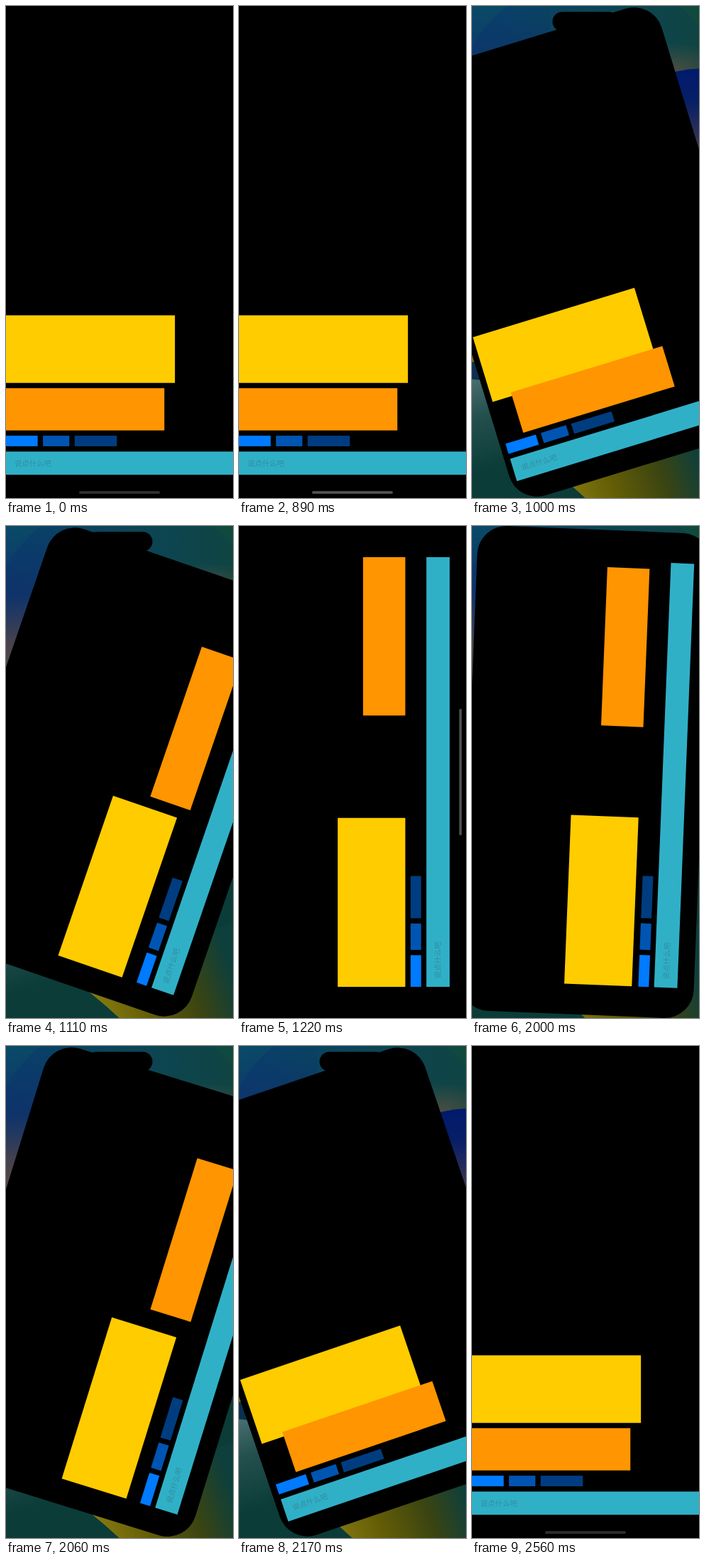
Animation, 320 px wide and 694 px high, one loop 3000 ms. Source, as an HTML page:

```html
<!DOCTYPE html>
<html lang="zh">
<head>
<meta charset="utf-8">
<title>Rotation</title>
<style>
  html, body { margin: 0; width: 100%; height: 100%; overflow: hidden; background: #000; }
  svg { display: block; width: 100%; height: 100%; }
  text { font: 14px "Noto Sans CJK SC", "Noto Sans CJK", sans-serif; fill: #3c3c43; fill-opacity: .3; }
</style>
</head>
<body>
<svg viewBox="0 0 430 932" preserveAspectRatio="none">
  <defs>
    <linearGradient id="sky">
      <stop offset="0" stop-color="#0a4a68"/>
      <stop offset=".55" stop-color="#0b4a58"/>
      <stop offset="1" stop-color="#10493c"/>
    </linearGradient>
    <linearGradient id="disc">
      <stop offset="0" stop-color="#093f70"/>
      <stop offset=".5" stop-color="#0b4558"/>
      <stop offset="1" stop-color="#11443c"/>
    </linearGradient>
    <linearGradient id="dusk" x2="0" y2="1">
      <stop offset="0" stop-color="#0c2c6c" stop-opacity="0"/>
      <stop offset=".45" stop-color="#10306a" stop-opacity=".8"/>
      <stop offset=".75" stop-color="#45424e"/>
      <stop offset="1" stop-color="#5a4a40"/>
    </linearGradient>
    <linearGradient id="navy" gradientUnits="userSpaceOnUse" x1="0" y1="88" x2="0" y2="205">
      <stop offset="0" stop-color="#001a6c"/>
      <stop offset=".4" stop-color="#081f66"/>
      <stop offset="1" stop-color="#41384e"/>
    </linearGradient>
    <linearGradient id="moss" gradientUnits="userSpaceOnUse" x1="0" y1="525" x2="40" y2="650">
      <stop offset="0" stop-color="#4a6f70"/>
      <stop offset=".4" stop-color="#24504e"/>
      <stop offset="1" stop-color="#0b3c38"/>
    </linearGradient>
    <linearGradient id="olive" gradientUnits="userSpaceOnUse" x1="135" y1="694" x2="320" y2="630">
      <stop offset="0" stop-color="#857a10"/>
      <stop offset=".35" stop-color="#625c06"/>
      <stop offset=".7" stop-color="#3a4412"/>
      <stop offset="1" stop-color="#0d3f3c"/>
    </linearGradient>
    <radialGradient id="ember">
      <stop offset="0" stop-color="#59503f" stop-opacity=".8"/>
      <stop offset="1" stop-color="#59503f" stop-opacity="0"/>
    </radialGradient>
  </defs>

  <g id="wall" transform="scale(1.34375)">
    <rect width="320" height="694" fill="url(#sky)"/>
    <circle cx="170" cy="150" r="193" fill="url(#disc)"/>
    <rect width="110" height="215" fill="url(#dusk)"/>
    <ellipse cx="285" cy="92" rx="70" ry="40" fill="url(#ember)"/>
    <circle cx="330" cy="300" r="212" fill="url(#navy)"/>
    <rect y="440" width="320" height="254" fill="#0b3c38"/>
    <rect y="440" width="30" height="62" fill="#8a6a10"/>
    <rect y="502" width="40" height="40" fill="#0b3050"/>
    <circle cx="-10" cy="694" r="168" fill="url(#moss)"/>
    <path d="M80 630Q120 656 160 694H320V560Z" fill="url(#olive)"/>
  </g>

  <g id="win">
    <rect id="back"/>
    <rect id="yellow" fill="#fc0"/>
    <rect id="orange" fill="#ff9500"/>
    <rect id="chip1" fill="#007aff"/>
    <rect id="chip2" fill="#0055b2"/>
    <rect id="chip3" fill="#003d80"/>
    <rect id="bar" fill="#30b0c7"/>
    <text id="hint">说点什么吧</text>
    <rect id="home" rx="2.5"/>
  </g>
  <rect id="island" x="152.5" y="11" width="125" height="37" rx="18.5"/>
</svg>

<script>
const LOOP = 3000, FPS = 18, TURN = 292;
const TO_WIDE = 912, TO_TALL = 1967;
const $ = id => document.getElementById(id);
const mix = (a, b, p) => a + (b - a) * p;
const clamp = v => Math.min(1, Math.max(0, v));

// Cubic bezier (.42, 0, .58, 1)
function easeInOut(x) {
  if (x <= 0 || x >= 1) return clamp(x);
  let lo = 0, hi = 1;
  for (let i = 0; i < 24; i++) {
    const s = (lo + hi) / 2, r = 1 - s;
    const bx = 1.26 * r * r * s + 1.74 * r * s * s + s * s * s;
    if (bx < x) lo = s; else hi = s;
  }
  return lo * lo * (3 - 2 * lo);
}

function place(id, x, y, w, h) {
  const el = $(id);
  el.setAttribute('x', x);
  el.setAttribute('y', y);
  el.setAttribute('width', w);
  el.setAttribute('height', h);
}

// Lays out the window between portrait (p = 0) and landscape (p = 1)
function layout(p) {
  const w = mix(430, 932, p), h = mix(932, 430, p);
  const left = mix(0, 59, p), right = w - left;
  const bottom = h - mix(44, 31, p);
  const barY = bottom - 44, chipY = barY - 30, cardEnd = chipY - 10;

  $('win').setAttribute('transform',
    `translate(215 466) rotate(${-90 * p}) translate(${-w / 2} ${-h / 2})`);
  place('back', 0, 0, w, h);
  place('yellow', left, mix(cardEnd - 218, cardEnd - 128, p), 320, 128);
  place('orange', mix(left, right - 300, p), cardEnd - 80, 300, 80);
  place('chip1', left, chipY, 60, 20);
  place('chip2', left + 70, chipY, 50, 20);
  place('chip3', left + 130, chipY, 80, 20);
  place('bar', left, barY, right - left, 44);
  $('hint').setAttribute('x', left + 16);
  $('hint').setAttribute('y', barY + 27);
  const len = mix(153, 240, p);
  place('home', (w - len) / 2, h - 13, len, 5);
}

// Home indicator brightness: [from ms, grey level]
const GLOW = [[0, 50], [880, 82], [1200, 78], [1320, 72], [1440, 60], [1550, 50],
  [1830, 46], [2250, 80], [2440, 62], [2550, 46]];

function render(ms) {
  const t = Math.floor((ms % LOOP + 6) * FPS / 1000) * 1000 / FPS;
  const p = easeInOut((t - TO_WIDE) / TURN) - easeInOut((t - TO_TALL) / TURN);
  const turning = p > 0 && p < 1;

  layout(p);
  $('back').setAttribute('rx', turning ? 55 : 0);
  $('wall').style.display = $('island').style.display = turning ? '' : 'none';
  $('home').style.display = turning ? 'none' : '';
  const g = GLOW.filter(k => t >= k[0]).pop()[1];
  $('home').setAttribute('fill', `rgb(${g},${g},${g})`);
}

const start = performance.now();
function tick() {
  render(performance.now() - start);
  requestAnimationFrame(tick);
}
tick();
</script>
</body>
</html>
```
